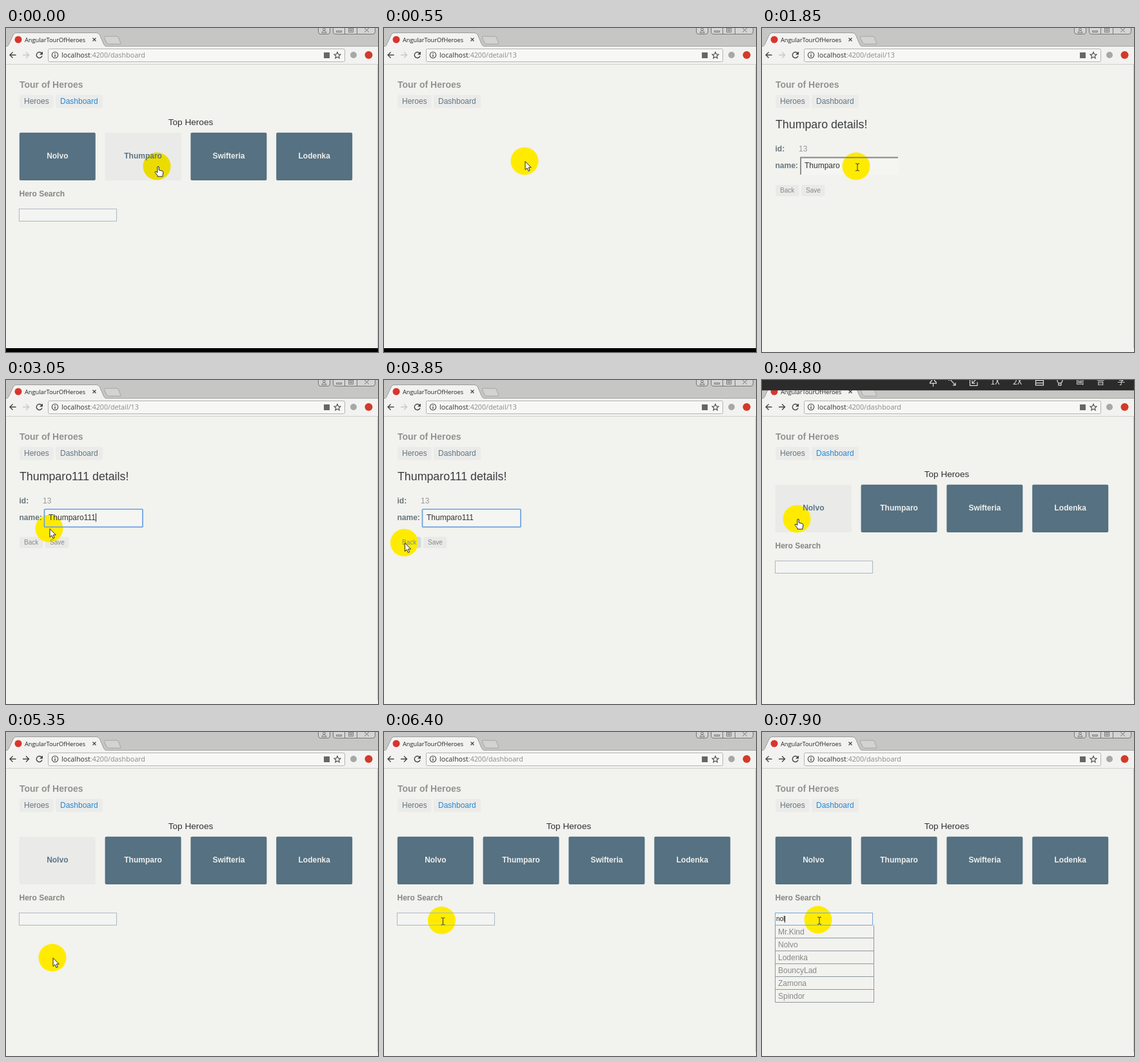
An HTML page that plays this animation: 577 px wide and 504 px high, repeating every 8 s.

```html
<!DOCTYPE html>
<html lang="en">
<head>
<meta charset="utf-8">
<title>Tour of Heroes</title>
<style>
html, body { margin: 0; width: 100%; height: 100%; overflow: hidden; background: #f2f2ee; }
svg { display: block; width: 100%; height: 100%; }
text { font: 12px "Liberation Sans", Arial, sans-serif; fill: #888; white-space: pre; }
.b { font-weight: bold; }
.ui { font-family: "Open Sans", "Noto Sans", sans-serif; }
.line { fill: none; stroke: #444; stroke-width: 1.4; }
.thin { fill: none; stroke: #777; stroke-width: 1; }
.bar text { font: 12.5px "Noto Sans CJK SC", "Noto Sans CJK", sans-serif; fill: #ddd; }
.bar path, .bar circle { fill: none; stroke: #ddd; stroke-width: 1.2; }
</style>
</head>
<body>
<svg viewBox="0 0 577 504">
  <rect width="577" height="504" fill="#f2f2ee"/>
  <g id="back">
    <rect x="21" y="104" width="52.5" height="20.5" rx="3" fill="#ebebe9"/>
    <rect x="77" y="104" width="73" height="20.5" rx="3" fill="#ebebe9"/>
  </g>
  <circle id="spot" r="21.5"/>
  <g id="front">
    <text class="b" x="21" y="92.5" style="font-size:14px;fill:#929292">Tour of Heroes</text>
    <text x="28" y="118" style="fill:#667580">Heroes</text>
    <text id="dashLink" x="84" y="118">Dashboard</text>
  </g>
  <rect id="strip" y="498" width="577" height="6"/>
  <path d="M576.5 56V498" stroke="#c3c9ce"/>

  <g id="chrome">
    <rect width="577" height="28" fill="#c6c6c5"/>
    <path d="M0 28.5H2Q4 27 5 24L11 11Q12.500 7.500 16 7.500H140Q144 7.500 145.500 11L151 24Q152 27.500 155 28.500V30H0Z" fill="#f2f2f0" stroke="#9c9c9c"/>
    <path d="M153 13H172Q174 13 174.500 15L178 24Q178 25 177 25H159Q157 25 156 23L152 14Z" fill="#d3d3d2" stroke="#a4a4a4"/>
    <circle cx="19" cy="18" r="5.5" fill="#d8352e"/>
    <text class="ui" x="29" y="21.500" style="font-size:9.25px;fill:#222">AngularTourOfHeroes</text>
    <path d="M134.500 15.500L139.500 20.500M139.500 15.500L134.500 20.500" class="line" style="stroke-width:1.200"/>
    <g class="thin">
      <path d="M484.500 0V6Q484.500 9.500 488 9.500H499Q502.500 9.500 502.500 6V0M507.500 0V6Q507.500 9.500 511 9.500H569Q572.500 9.500 572.500 6V0M525.500 0V9M544.500 0V9" fill="#d4d4d3"/>
      <circle cx="493.500" cy="2" r="1.800"/>
      <path d="M490 7.500Q490 4.500 493.500 4.500T497 7.500ZM512.500 4.500H520.500V6.500H512.500ZM531.500 .5H538.500V6.500H531.500ZM533.500 2.500H536.500V4.500H533.500ZM556 0L563 6.500M563 0L556 6.500"/>
    </g>
    <path d="M0 29H577V56H0Z" fill="#f2f2f0"/>
    <path d="M155 28.500H577" stroke="#a8a8a8"/>
    <path d="M0 56.500H577" stroke="#cfcfcd"/>
    <rect x="65.500" y="32.500" width="460" height="20" rx="2" fill="#f7f7f5" stroke="#b4b4b4"/>
    <path class="line" d="M15.500 42H6M10.500 37.500L6 42L10.500 46.500"/>
    <path id="forward" class="line" d="M26 42H35.500M31 37.500L35.500 42L31 46.500"/>
    <path class="line" d="M55.500 39.500A4.500 4.500 0 1 0 56 43.500"/>
    <path d="M57 36.500V41.500H52Z" fill="#444"/>
    <circle class="line" cx="76" cy="42" r="4.700" style="stroke-width:1.100"/>
    <path class="line" d="M76 41.500V45M76 39V40.200"/>
    <text class="ui" x="86" y="46" style="font-size:10.700px"><tspan fill="#333">localhost</tspan><tspan id="url"></tspan></text>
    <rect x="493" y="38" width="9" height="9" fill="#666"/>
    <path class="line" style="stroke-width:1.100" d="M514 37.500L515.400 40.800L519 41.100L516.300 43.500L517.100 47L514 45.100L510.900 47L511.700 43.500L509 41.100L512.600 40.800Z"/>
    <circle cx="539" cy="42" r="5" fill="#a5a8a8"/>
    <circle cx="562.500" cy="42" r="6" fill="#d23a2a"/>
  </g>

  <g id="bar" class="bar">
    <rect width="577" height="22" fill="#2b2b2b"/>
    <path d="M262.500 3H268.500M263.500 3V7Q260.500 8.500 260.500 11H270.500Q270.500 8.500 267.500 7V3M265.500 11V16"/>
    <path d="M290 7V3H294M290 3L300 14M296 14H300V10"/>
    <path d="M329 3H322.500V14.500H334V9M334 3L326 11M326 6.500V11H330.500"/>
    <text x="354.500" y="13">1X</text><text x="389" y="13">2X</text>
    <path d="M424.500 3H436.500V14H424.500ZM424.500 6.500H436.500M424.500 10.500H436.500"/>
    <circle cx="462" cy="6.800" r="4"/><path d="M460 10.500V14H464V10.500"/>
    <text x="487" y="13">画</text><text x="519" y="13">音</text><text x="551" y="13">字</text>
  </g>

  <g id="pointer">
    <path id="arrow" d="M0 0V13L3 10.300L5 15L7.200 14L5.200 9.500H9.300Z" fill="#fff" stroke="#222"/>
    <path id="hand" d="M-1.200 1Q0 -.5 1.200 1V6L6 7.200Q8 7.800 8 10L7 14.500V16H-1V14.500L-5 9.500Q-5 7.500 -3 8.500L-1.200 10Z" fill="#fff" stroke="#222"/>
    <path id="beam" d="M-3 -5.500H-1L0 -4.500L1 -5.500H3M0 -4.500V4.500M-3 5.500H-1L0 4.500L1 5.500H3" fill="none" stroke="#333"/>
  </g>
</svg>

<script>
const LOOP = 8000;
const $ = id => document.getElementById(id);
const heroes = ['Nolvo', 'Thumparo', 'Swifteria', 'Lodenka'];
const matches = ['Mr.Kind', 'Nolvo', 'Lodenka', 'BouncyLad', 'Zamona', 'Spindor'];
const cardX = i => 20.8 + i * 132.8;
const add = (id, html) => $(id).insertAdjacentHTML('beforeend', html);
const button = x => `<rect x="${x}" y="244" width="36.5" height="17.500" rx="3" fill="#e9e9e7"/>`;

add('back', `
  <g id="cardBoxes">${heroes.map((_, i) =>
    `<rect id="card${i}" x="${cardX(i)}" y="162.700" width="118" height="74.300" rx="2"/>`).join('')}</g>
  <g id="detailBack">
    <rect id="nameFill" x="60" y="201" width="152" height="27.500" fill="#f5f5f2"/>
    <g id="backButton">${button(21)}</g>${button(61)}
  </g>
  <rect id="searchFill" x="20.500" y="281.500" width="151" height="19" fill="#f4f4f2"/>`);

add('front', `
  <g id="dash">
    <text x="286.500" y="151" text-anchor="middle" style="font-size:13.600px;fill:#2d3236">Top Heroes</text>
    <g id="cardNames">${heroes.map((name, i) =>
      `<text id="name${i}" class="b" x="${cardX(i) + 59}" y="203" text-anchor="middle">${name}</text>`).join('')}</g>
    <g id="search">
      <text class="b" x="20.500" y="262" style="fill:#858585">Hero Search</text>
      <rect id="searchBox" x="20.500" y="281.500" width="151" height="19" fill="none"/>
      <text id="query" x="22" y="294" style="font-size:10px;fill:#222"></text>
      <path id="queryCaret" d="M.5 286V296.500" stroke="#222"/>
    </g>
    <g id="list">${matches.map((name, i) => `
      <path d="M20.500 ${300.5 + i * 20}V${320.5 + i * 20}H173.500V${300.5 + i * 20}" fill="none" stroke="#8d979f"/>
      <text x="25" y="${315 + i * 20}">${name}</text>`).join('')}</g>
  </g>
  <g id="detail">
    <text id="title" x="21" y="156" style="font-size:17.800px;fill:#3a3d40"></text>
    <text class="b" x="20.500" y="191.500" style="fill:#68767f">id:</text>
    <text x="57" y="191.500" style="fill:#999">13</text>
    <text class="b" x="20.500" y="218" style="fill:#68767f">name:</text>
    <path id="inset" d="M60 228V201.500H211" fill="none" stroke="#858585" stroke-width="1.800"/>
    <rect id="ring" x="59.500" y="201" width="152.500" height="27.700" rx="1" fill="none" stroke="#6ba0e0" stroke-width="1.700"/>
    <text id="nameText" x="66" y="218" style="fill:#333"></text>
    <path id="nameCaret" d="M.5 207.500V220.500" stroke="#222"/>
    <text x="28" y="256" style="font-size:10px">Back</text>
    <text x="68" y="256" style="font-size:10px">Save</text>
  </g>`);

// time, x, y of the highlight centre
const path = [
  [0, 234, 215], [150, 234, 215], [450, 218, 207], [1000, 218, 207],
  [1650, 146, 215], [1950, 146, 215], [2250, 54, 221], [2750, 54, 221],
  [3050, 67, 231], [3500, 29, 253], [4000, 32, 253], [4350, 52, 213],
  [4550, 52, 213], [5200, 58, 222], [5350, 72, 351], [5600, 72, 351],
  [6100, 92, 293], [6500, 89, 293], [6900, 87, 292], [LOOP, 87, 292]
];

const within = (t, a, b) => t >= a && t < b;
const ramp = (t, a, b) => Math.min(1, Math.max(0, (t - a) / (b - a)));
const show = (id, on) => $(id).setAttribute('display', on ? 'inline' : 'none');
const paint = (id, fill) => { $(id).style.fill = fill; };
const write = (id, s) => { if ($(id).textContent !== s) $(id).textContent = s; };
const typed = (t, s, times) => s.slice(0, times.filter(at => t >= at).length);

function locate(t) {
  const i = path.findIndex((p, k) => k && t <= p[0]);
  const [t0, x0, y0] = path[i - 1], [t1, x1, y1] = path[i];
  const k = ramp(t, t0, t1), e = k * k * (3 - 2 * k);
  return [x0 + (x1 - x0) * e, y0 + (y1 - y0) * e];
}

function placeCaret(id, textId, x, on) {
  show(id, on);
  if (on) $(id).setAttribute('transform', `translate(${Math.round(x + $(textId).getComputedTextLength())})`);
}

function render(t) {
  const onDetail = within(t, 100, 4000);
  const loaded = within(t, 900, 4000);
  const cards = t < 100 || t >= 4600;
  const focused = t >= 1950;
  const searching = t >= 6550;

  write('url', `:4200/${onDetail ? 'detail/13' : 'dashboard'}`);
  paint('dashLink', onDetail ? '#607787' : '#2389d6');
  $('forward').style.stroke = t < 4000 ? '#c8c8c8' : '#444';
  show('strip', t < 1300);

  show('dash', !onDetail);
  show('cardBoxes', cards);
  show('cardNames', cards);
  const hovered = t < 100 ? 1 : within(t, 4600, 5400) ? 0 : -1;
  heroes.forEach((_, i) => {
    paint('card' + i, i === hovered ? '#eaeae9' : '#557182');
    paint('name' + i, i === hovered ? '#5c7586' : '#eeeeec');
  });

  const shift = `translate(0 ${cards ? 0 : -67})`;
  $('search').setAttribute('transform', shift);
  $('searchFill').setAttribute('transform', shift);
  show('searchFill', !onDetail);
  $('searchBox').style.stroke = searching ? '#78a4d8' : '#aab8c4';
  write('query', typed(t, 'nol', [7050, 7450, 7550]));
  placeCaret('queryCaret', 'query', 22, searching);
  show('list', t >= 7750);

  show('detail', loaded);
  show('detailBack', loaded);
  const hero = heroes[1] + typed(t, '111', [2700, 2800, 2900]);
  write('title', hero + ' details!');
  write('nameText', hero);
  show('inset', !focused);
  show('ring', focused);
  placeCaret('nameCaret', 'nameText', 66, loaded && focused && !within(t, 2400, 2700) && t < 3400);
  paint('backButton', '');
  $('backButton').firstElementChild.style.fill = t >= 3350 ? '#d2d9dc' : '';

  $('bar').setAttribute('transform', `translate(0 ${-23 + 23 * (ramp(t, 4000, 4200) - ramp(t, 4750, 4950))})`);

  const [x, y] = locate(t);
  const kind = t < 100 || within(t, 4650, 5300) ? 'hand'
    : within(t, 1400, 2080) || t >= 6050 ? 'beam' : 'arrow';
  const [dx, dy] = { hand: [2, 0], beam: [2, 1.5], arrow: [1, 0.5] }[kind];
  $('spot').setAttribute('transform', `translate(${x} ${y})`);
  paint('spot', t < 150 || within(t, 3900, 4000) ? '#ebdc00' : '#ffeb00');
  $('pointer').setAttribute('transform', `translate(${x + dx} ${y + dy})`);
  ['hand', 'beam', 'arrow'].forEach(id => show(id, id === kind));
}

const start = performance.now();
function tick() {
  render((performance.now() - start) % LOOP);
  requestAnimationFrame(tick);
}
tick();
</script>
</body>
</html>
```
